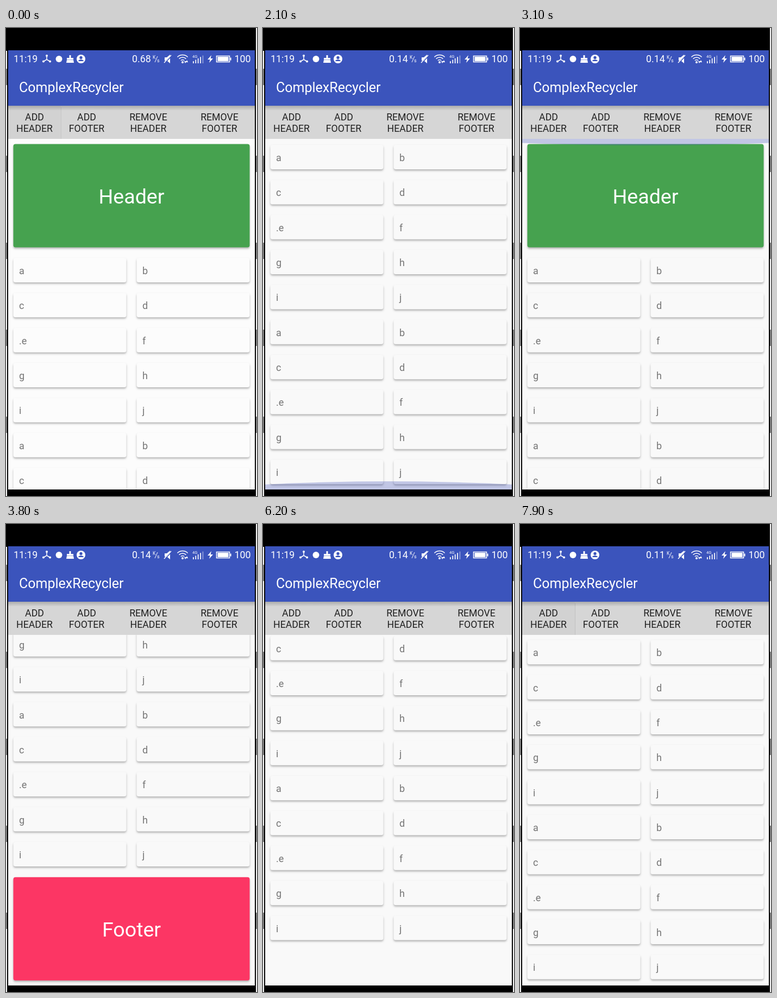
Write an HTML page with a canvas that moves like this. It is 462x861 px and loops after 8000 ms.

```html
<!DOCTYPE html>
<html lang="en">
<head>
<meta charset="utf-8">
<title>ComplexRecycler</title>
<style>
html, body { margin: 0; width: 100%; height: 100%; overflow: hidden; background: #000; }
canvas { display: block; }
</style>
</head>
<body>
<canvas id="stage" width="462" height="861"></canvas>
<script>
const ctx = document.getElementById('stage').getContext('2d');
const LOOP = 8000, STEP = 100;
const BLUE = '#3b54bc', WHITE = '#fff';
const LEFT = 4, RIGHT = 458, LIST_TOP = 204, LIST_END = 849;
const ROWS = 15, PITCH = 64.35;
const LABELS = ['a', 'b', 'c', 'd', '.e', 'f', 'g', 'h', 'i', 'j'];
const CELLS = [LEFT, 101, 196, 328, RIGHT];
const BUTTONS = ['ADD HEADER', 'ADD FOOTER', 'REMOVE HEADER', 'REMOVE FOOTER'];

// Resting heights of the first row of cards.
const UNDER_HEADER = 423, AT_TOP = 213.3, AT_END = -106.7, OVER_FOOTER = -316;
const MOVES = [
  { start: 1600, end: 2000, to: AT_END },
  { start: 2500, end: 3000, to: UNDER_HEADER },
  { start: 3500, end: 3600, to: OVER_FOOTER },
  { start: 6050, end: 6300, to: AT_END },
  { start: 6600, end: 7105, to: AT_TOP }
];
const HITS = [
  { start: 1900, edge: LIST_END, reach: -15 },
  { start: 2900, edge: LIST_TOP, reach: 12 },
  { start: 7000, edge: LIST_TOP, reach: 12 }
];
const HIT_TIME = 500;
const PRESSES = [
  { cell: 1, start: 3500 },
  { cell: 2, start: 5100 },
  { cell: 3, start: 5800 },
  { cell: 0, start: 7900 }
];
const PRESS_TIME = 300;

const progress = (t, start, end) => Math.min(1, Math.max(0, (t - start) / (end - start)));
const smooth = p => p * p * (3 - 2 * p);

function firstRow(t) {
  return MOVES.reduce(
    (y, { start, end, to }) => y + (to - y) * smooth(progress(t, start, end)),
    UNDER_HEADER);
}

function rect(x, y, w, h, color) {
  ctx.fillStyle = color;
  ctx.fillRect(x, y, w, h);
}

function text(str, x, y, size, color = WHITE, align = 'left') {
  ctx.font = `${size}px Roboto, sans-serif`;
  ctx.textAlign = align;
  ctx.fillStyle = color;
  ctx.fillText(str, x, y);
}

function trace(points) {
  ctx.beginPath();
  points.forEach(([x, y]) => ctx.lineTo(x, y));
}

function shape(...points) {
  trace(points);
  ctx.fillStyle = WHITE;
  ctx.fill();
}

function line(x0, y0, x1, y1, width = 1.5, color = WHITE) {
  trace([[x0, y0], [x1, y1]]);
  ctx.lineWidth = width;
  ctx.strokeStyle = color;
  ctx.stroke();
}

function disc(x, y, r, color = WHITE) {
  ctx.beginPath();
  ctx.arc(x, y, r, 0, Math.PI * 2);
  ctx.fillStyle = color;
  ctx.fill();
}

function card(x, y, w, h, color) {
  ctx.save();
  ctx.shadowColor = 'rgba(0,0,0,.28)';
  ctx.shadowBlur = 3.5;
  ctx.shadowOffsetY = 2.5;
  ctx.beginPath();
  ctx.roundRect(x, y, w, h, 4);
  ctx.fillStyle = color;
  ctx.fill();
  ctx.restore();
}

function banner(label, y, color, alpha = 1) {
  ctx.globalAlpha = alpha;
  card(13.5, y, 435, 190, color);
  text(label, 231, Math.round(y + 109), 37.6, WHITE, 'center');
  ctx.globalAlpha = 1;
}

function glow({ start, edge, reach }, t) {
  const size = reach * Math.sin(Math.PI * progress(t, start, start + HIT_TIME) ** 0.75);
  ctx.beginPath();
  ctx.moveTo(LEFT, edge);
  ctx.lineTo(LEFT, edge + size * 0.62);
  ctx.quadraticCurveTo(231, edge + size * 1.38, RIGHT, edge + size * 0.62);
  ctx.lineTo(RIGHT, edge);
  ctx.fillStyle = 'rgba(63,81,181,.3)';
  ctx.fill();
}

function drawList(t) {
  const top = firstRow(t);
  const paper = t < MOVES[0].start ? '#fcfcfc' : '#f9f9f9';
  ctx.save();
  ctx.beginPath();
  ctx.rect(LEFT, LIST_TOP, RIGHT - LEFT, LIST_END - LIST_TOP);
  ctx.clip();
  rect(LEFT, LIST_TOP, RIGHT - LEFT, LIST_END - LIST_TOP, paper);
  if (t < 5300) banner('Header', top - 209.5, '#46a24f');
  for (let i = 0; i < ROWS * 2; i++) {
    const x = 13.5 + (i % 2) * 227;
    const y = top + Math.floor(i / 2) * PITCH;
    card(x, y, 208, 45, paper);
    text(LABELS[i % LABELS.length], x + 10.5, Math.round(y + 30), 18, '#757575');
  }
  if (t >= 3600) banner('Footer', top + 965.7, '#fc3664', 1 - progress(t, 5900, 6100));
  HITS.forEach(hit => glow(hit, t));
  ctx.restore();
}

function drawButtons(t) {
  rect(LEFT, 143, RIGHT - LEFT, 61, '#d6d6d6');
  for (const { cell, start } of PRESSES) {
    const age = (t - start + LOOP) % LOOP;
    if (age >= PRESS_TIME) continue;
    const x = CELLS[cell], end = CELLS[cell + 1];
    const edge = cell ? x - 1 : end;
    rect(x, 143, end - x, 61, 'rgba(0,0,0,.02)');
    rect(edge, 146, 1, 58, `rgba(0,0,0,${0.1 * (1 - age / PRESS_TIME)})`);
  }
  const shade = ctx.createLinearGradient(0, 143, 0, 152);
  shade.addColorStop(0, 'rgba(0,0,0,.2)');
  shade.addColorStop(1, 'rgba(0,0,0,0)');
  rect(LEFT, 143, RIGHT - LEFT, 9, shade);
  BUTTONS.forEach((label, i) => {
    const middle = (CELLS[i] + CELLS[i + 1]) / 2;
    label.split(' ').forEach((word, row) =>
      text(word, middle, 170 + row * 21, 17.7, '#202020', 'center'));
  });
}

function drawLeftIcons() {
  // linked nodes
  for (let i = 0; i < 3; i++) {
    const angle = Math.PI * (i * 2 / 3 - 0.5);
    const x = 75 + 7 * Math.cos(angle), y = 58 + 7 * Math.sin(angle);
    line(75, 58, x, y);
    disc(x, y, 2);
  }
  disc(97.5, 57, 6);
  // broom
  rect(116.5, 50, 3, 6, WHITE);
  rect(112, 55, 12, 3, WHITE);
  shape([112, 58.5], [124, 58.5], [125, 64], [111, 64]);
  // contact badge
  disc(138, 57, 8);
  disc(138, 54.5, 2.7, BLUE);
  ctx.beginPath();
  ctx.ellipse(138, 61, 5, 3, 0, Math.PI, 0);
  ctx.fill();
}

function drawRightIcons() {
  // muted speaker
  shape([292, 54], [296, 54], [302, 49], [302, 65], [296, 60], [292, 60]);
  line(291, 65, 305, 50, 3, BLUE);
  line(291, 64, 304, 50);
  // wireless arcs
  disc(325, 63, 2);
  for (let r = 4.5; r < 14; r += 4.5) {
    ctx.beginPath();
    ctx.arc(325, 63, r, Math.PI * 1.25, Math.PI * 1.75);
    ctx.stroke();
  }
  shape([328, 61], [332, 61], [330, 65]);
  shape([331, 63], [335, 63], [333, 59]);
  // cell signal
  text('4G', 343, 55, 7.5);
  for (let i = 0; i < 5; i++) {
    const h = 4 + i * 2.6;
    rect(344 + i * 4.4, 65 - h, 1.7, h, i < 4 ? WHITE : 'rgba(255,255,255,.45)');
  }
  // charging and battery
  shape([378, 50], [371, 58], [375.5, 58], [374, 64], [381, 56], [376.5, 56]);
  ctx.strokeRect(387.5, 51.5, 24, 11);
  rect(389.5, 53, 20, 8, WHITE);
  rect(412.5, 54.5, 2, 5, WHITE);
}

function drawBar(t) {
  rect(LEFT, 41, RIGHT - LEFT, 102, BLUE);
  text('11:19', 14, 63, 17.8);
  drawLeftIcons();
  text(t < 1200 ? '0.68' : t < 6800 ? '0.14' : '0.11', 232, 63, 17.8);
  text('K', 270, 57, 8.5);
  line(274, 63, 279, 52, 1);
  text('s', 278, 63, 9);
  drawRightIcons();
  text('100', 420.5, 63, 17.8);
  text('ComplexRecycler', 24, 118, 25);
}

function drawFrame() {
  rect(0, 0, 462, 861, '#000');
  rect(460, 0, 2, 861, '#f4f4f4');
  rect(0, 42, 2, 819, '#f4f4f4');
  for (let y = 75; y < 800; y += 160) {
    rect(1, y, 1, 30, '#000');
    rect(460, y, 1, 30, '#000');
  }
}

function draw(now) {
  const t = Math.floor((now % LOOP) / STEP) * STEP;
  drawFrame();
  drawList(t);
  drawButtons(t);
  drawBar(t);
}

const origin = performance.now();
function tick() {
  draw(performance.now() - origin);
  requestAnimationFrame(tick);
}
tick();
</script>
</body>
</html>
```
